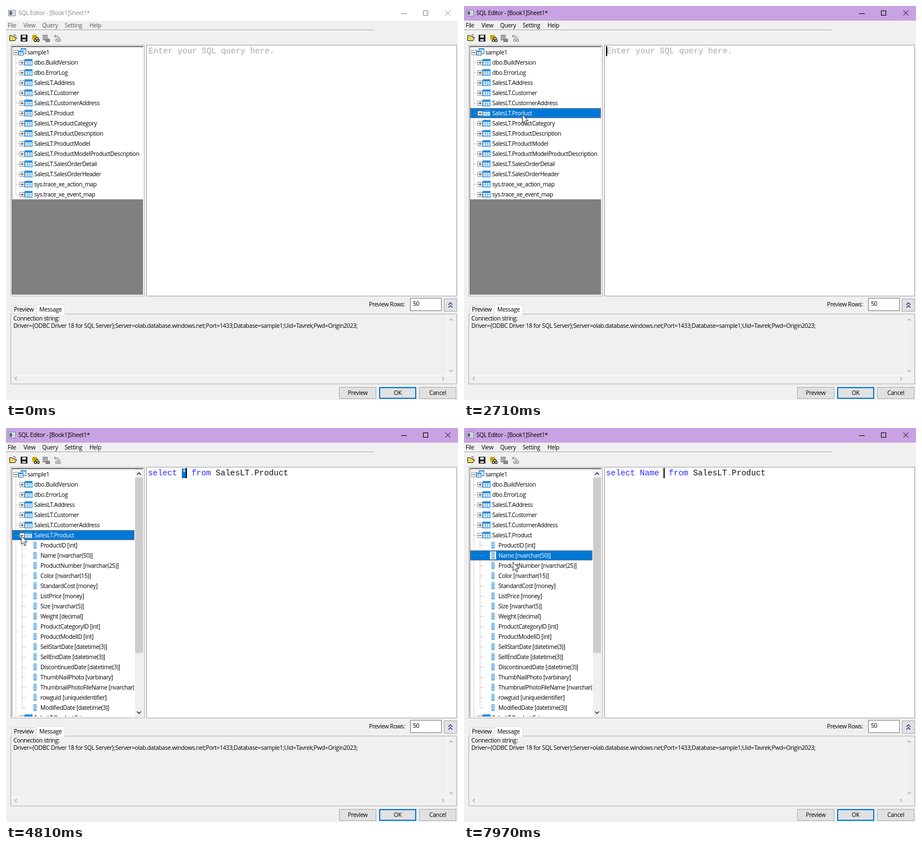
Recreate the animation shown at these times as an HTML page. Size 802 by 699 pixels, loop 8 s.

```html
<!DOCTYPE html>
<html lang="en">
<head>
<meta charset="utf-8">
<title>SQL Editor</title>
<style>
html, body { margin: 0; width: 100%; height: 100%; overflow: hidden; background: #f0f0f0; }
svg { display: block; }
text { font: 10.4px "Open Sans", "Noto Sans", sans-serif; letter-spacing: -.35px; }
.sql text { font: 14.3px "Liberation Mono", monospace; letter-spacing: 0; }
rect, .crisp { shape-rendering: crispEdges; }
</style>
</head>
<body>
<svg id="stage" width="802" height="699" viewBox="0 0 802 699"></svg>
<script>
const LOOP = 8000, CHAR = 8.58, SQL_X = 252;
const TABLES = ['dbo.BuildVersion', 'dbo.ErrorLog', 'SalesLT.Address', 'SalesLT.Customer',
  'SalesLT.CustomerAddress', 'SalesLT.Product', 'SalesLT.ProductCategory',
  'SalesLT.ProductDescription', 'SalesLT.ProductModel', 'SalesLT.ProductModelProductDescription',
  'SalesLT.SalesOrderDetail', 'SalesLT.SalesOrderHeader', 'sys.trace_xe_action_map',
  'sys.trace_xe_event_map'];
const COLUMNS = ['ProductID [int]', 'Name [nvarchar(50)]', 'ProductNumber [nvarchar(25)]',
  'Color [nvarchar(15)]', 'StandardCost [money]', 'ListPrice [money]', 'Size [nvarchar(5)]',
  'Weight [decimal]', 'ProductCategoryID [int]', 'ProductModelID [int]',
  'SellStartDate [datetime(3)]', 'SellEndDate [datetime(3)]', 'DiscontinuedDate [datetime(3)]',
  'ThumbNailPhoto [varbinary]', 'ThumbnailPhotoFileName [nvarchar(50)]',
  'rowguid [uniqueidentifier]', 'ModifiedDate [datetime(3)]'];
const OPEN_ROW = 5;

const rect = (x, y, w, h, fill, more = '') =>
  `<rect x="${x}" y="${y}" width="${w}" height="${h}" fill="${fill}" ${more}/>`;
const box = (x, y, w, h, fill, line) => rect(x, y, w, h, line) + rect(x + 1, y + 1, w - 2, h - 2, fill);
const text = (x, y, s, fill = '#000', more = '') => `<text x="${x}" y="${y}" fill="${fill}" ${more}>${s}</text>`;
const path = (d, line, w = 1, more = '') =>
  `<path d="${d}" fill="none" stroke="${line}" stroke-width="${w}" ${more}/>`;
const dots = (d, line = '#a8a8a8') => path(d, line, 1, 'class="crisp" stroke-dasharray="1 1"');

// ---- tree ----
function expander(x, y, open) {
  return box(x - 4, y - 4, 9, 9, '#fff', '#919191') +
    path(`M${x - 2} ${y + .5}h5` + (open ? '' : `M${x + .5} ${y - 2}v5`), '#333', 1, 'class="crisp"');
}
function tableIcon(x, y) {
  return box(x, y, 14, 12, '#fff', '#2b86d0') + rect(x, y, 14, 4, '#2f8fdd') +
    path(`M${x + 5} ${y + 4}v8M${x + 9} ${y + 4}v8M${x} ${y + 6.5}h14M${x} ${y + 9.5}h14`, '#55a9ea');
}
function columnIcon(x, y) {
  return box(x, y, 5, 12, '#e9f5ff', '#3a8fd4') +
    path(`M${x} ${y + 3.5}h5M${x} ${y + 6.5}h5M${x} ${y + 9.5}h5`, '#3a8fd4');
}
function rootIcon() {
  return box(26, 75, 10, 10, '#d8ebfb', '#3679b8') + rect(26, 75, 10, 2, '#3679b8') +
    box(22, 79, 9, 9, '#fff', '#3679b8') + rect(22, 79, 9, 3, '#4a9be0') +
    path('M25.5 82v5M23 84.5h7', '#74b4ea');
}
function tree(open, picked) {
  const right = open ? 228 : 243;
  const bottom = 82 + 18 * (TABLES.length + (open ? COLUMNS.length : 0));
  const mark = y => rect(11, y - 9, right - 11, 18, '#0078d7') +
    dots(`M11 ${y - 8.5}H${right}M11 ${y + 8.5}H${right}M11.5 ${y - 9}v18M${right - .5} ${y - 9}v18`, '#ff8728');
  let rows = dots(`M17.5 87V${bottom}`) + expander(17, 82, true) + rootIcon() + text(38, 86, 'sample1');
  let y = 82;
  TABLES.forEach((name, i) => {
    y += 18;
    const on = picked === name, isOpen = open && i === OPEN_ROW;
    if (on) rows += mark(y);
    rows += dots(`M17 ${y + .5}h7`) + expander(28, y, isOpen) + tableIcon(33, y - 6) +
      text(50, y + 4, name, on ? '#fff' : '#000');
    if (!isOpen) return;
    rows += dots(`M28.5 ${y + 9}v${18 * COLUMNS.length - 8}`);
    COLUMNS.forEach(col => {
      y += 18;
      const hit = picked === col;
      if (hit) rows += mark(y);
      rows += dots(`M28 ${y + .5}h8`) + (hit ? rect(46, y - 7, 11, 14, '#fff') : '') +
        columnIcon(49, y - 6) + text(61, y + 4, col, hit ? '#fff' : '#000');
    });
  });
  const scroll = rect(229, 73, 14, 439, '#f0f0f0') + rect(229, 88, 14, 311, '#cdcdcd') +
    path('M232.5 83l3.5-3.5 3.5 3.5M232.5 503l3.5 3.5 3.5-3.5', '#4a2450', 1.6);
  return rect(11, 73, 232, 439, '#808080') + rect(11, 73, 232, open ? 439 : 270, '#fff') +
    `<g clip-path="url(#${open ? 'narrow' : 'wide'})">${rows}</g>` + (open ? scroll : '');
}

// ---- window ----
function titleBar(active) {
  const ink = active ? '#000' : '#8c8c8c', menu = active ? '#000' : '#5a5a5a';
  const names = [[3, 'File'], [31, 'View'], [64, 'Query'], [104, 'Setting'], [148, 'Help']];
  return rect(0, 0, 802, 26, active ? '#c8a2e2' : '#fff') +
    box(4, 7, 13, 11, '#fff', '#77849a') + rect(6, 9, 5, 7, '#5a6b86') + rect(12, 9, 3, 7, '#c4ccd8') +
    text(22, 16, 'SQL Editor - [Book1]Sheet1*', ink) +
    path('M701 13.5h10M740.5 8.5h8v8h-8z', ink, 1, 'class="crisp"') +
    path('M779.5 8l9 9M788.5 8l-9 9', ink) +
    names.map(([x, s]) => text(x, 38, s, menu)).join('');
}
function linkIcon(x, body, ink) {
  return rect(x, 51, 9, 10, body, 'rx="2"') +
    path(`M${x + 1} 53.5h7M${x + 1} 56.5h5`, ink, .8) +
    `<g fill="#f0f0f0" stroke="${ink}" stroke-width="1.4"><circle cx="${x + 6}" cy="61" r="2"/>` +
    `<circle cx="${x + 11}" cy="61" r="2"/><path d="M${x + 6} 58l3-3 3 3"/></g>`;
}
function toolbar() {
  return rect(0, 42, 652, 1, '#a0a0a0') + rect(0, 43, 652, 1, '#fff') +
    '<path d="M6.5 61.5v-9h4l1 1.5h4v2h3.5l-3 5.5z" fill="#f5d65a" stroke="#222"/>' +
    path('M13 51.5q3-2 4.5 1', '#222') +
    box(26, 51, 12, 12, '#222', '#111') + rect(29, 52, 6, 4, '#fff') + rect(29, 59, 6, 3, '#ddd') +
    linkIcon(46, '#f0d21c', '#2a2a14') +
    rect(65, 51, 9, 10, '#999') + path('M66 54.5h7M66 57.5h7', '#c8c8c8') + rect(70, 58, 8, 6, '#858585') +
    path('M86 53.5h7M88 51l-2 2.5 2 2.5M90 56.5h6', '#929292', 1.3) +
    '<g fill="none" stroke="#929292" stroke-width="1.3"><circle cx="90" cy="61" r="2"/><circle cx="95" cy="61" r="2"/></g>';
}
function button(x, label, main) {
  const edge = main ? rect(x, 676, 66, 21, '#0078d7') + rect(x + 2, 678, 62, 17, '#e1e1e1')
    : box(x, 676, 66, 21, '#e1e1e1', '#adadad');
  return edge + text(x + 33, 690, label, '#000', 'text-anchor="middle"');
}
function lowerPart() {
  const conn = 'Driver={ODBC Driver 18 for SQL Server};Server=olab.database.windows.net;' +
    'Port=1433;Database=sample1;Uid=Tavrek;Pwd=Origin2023;';
  return box(8, 546, 792, 125, '#f0f0f0', '#b0b0b0') +
    rect(783, 547, 1, 108, '#fafafa') + rect(9, 655, 790, 1, '#fafafa') +
    box(9, 531, 46, 16, '#f0f0f0', '#dcdcdc') + box(54, 529, 51, 19, '#fff', '#dcdcdc') +
    rect(55, 546, 49, 2, '#fff') +
    text(14, 542, 'Preview') + text(59, 542, 'Message') +
    text(13, 558, 'Connection string:') + text(13, 571, conn) +
    path('M787 558l3-3 3 3M787 646l3 3 3-3M19 658l-3 3 3 3M774 658l3 3-3 3', '#a6a6a6', 1.2) +
    text(644, 533, 'Preview Rows:') + box(717, 518, 56, 23, '#fff', '#7a7a7a') + text(722, 532, '50') +
    box(777, 519, 23, 23, '#e1e1e1', '#adadad') +
    path('M785 530l3.5-3.5 3.5 3.5M785 535l3.5-3.5 3.5 3.5', '#1c2f78', 1.3) +
    button(591, 'Preview') + button(662, 'OK', true) + button(733, 'Cancel');
}
function query(step) {
  const at = (i, s, fill) => text(SQL_X + i * CHAR, 84, s, fill);
  if (!step) return text(253, 84, 'Enter your SQL query here.', '#a6a6a0');
  const from = step === 1 ? 9 : 13, blue = '#2a2af5';
  return at(0, 'select', blue) +
    (step === 1 ? rect(312, 72, 8, 17, '#0078d7') + at(7, '*', '#fff') : at(7, 'Name', blue)) +
    at(from, 'from', blue) + at(from + 5, 'SalesLT', '#111') +
    at(from + 12, '.', '#777') + at(from + 13, 'Product', '#111');
}

const stage = document.getElementById('stage');
stage.innerHTML =
  `<defs><clipPath id="wide"><rect x="11" y="73" width="232" height="439"/></clipPath>
  <clipPath id="narrow"><rect x="11" y="73" width="217" height="439"/></clipPath></defs>` +
  rect(0, 0, 802, 699, '#f0f0f0') + '<g id="title"></g>' + toolbar() +
  box(8, 69, 238, 446, '#fff', '#b4b4b4') + rect(10, 71, 234, 442, '#696969') +
  rect(243, 72, 1, 441, '#e8e8e8') + rect(10, 512, 234, 1, '#e8e8e8') +
  '<g id="tree"></g>' + box(249, 69, 551, 446, '#fff', '#a0a0a0') +
  '<g id="sql" class="sql"></g><rect id="caret" y="71" height="18"/>' + lowerPart() +
  '<circle id="glow" r="10.5" fill="#f0e010" fill-opacity=".7"/>' +
  '<path id="mouse" d="M0 0V15.2L3.5 12L6 17.5L8.3 16.5L6 11.2H10.6Z" fill="#fff" stroke="#111" stroke-width=".9"/>';
const part = id => document.getElementById(id);
const mouse = part('mouse'), glow = part('glow'), caret = part('caret');

// ---- motion ----
const MOVES = [[0, 806, 700], [70, 787, 684], [510, 453, 578], [620, 453, 578], [1370, 102.5, 209.5],
  [1460, 102.5, 203], [1540, 102.5, 198], [1610, 103.5, 192.5], [3270, 103.5, 192.5], [3890, 22, 191],
  [4010, 22, 191], [4440, 27, 191], [5440, 27, 191], [5730, 50.5, 215], [6290, 87, 233],
  [6380, 87, 233], [6440, 87, 229.5], [7969, 87, 229.5], [7970, 87, 238], [LOOP, 87, 238]];
const PRESSES = [[2010, 2160], [2620, 2710], [2790, 2860], [4490, 4660], [6520, 6670], [6910, 7050]];

function pointer(t) {
  const i = MOVES.findIndex(m => m[0] > t);
  const [t0, x0, y0] = MOVES[i - 1], [t1, x1, y1] = MOVES[i];
  let k = (t - t0) / (t1 - t0);
  if (t1 - t0 > 350) k = k * k * (3 - 2 * k);
  return [x0 + (x1 - x0) * k, y0 + (y1 - y0) * k];
}
const shown = {};
function update(id, key, draw) {
  if (shown[id] === key) return;
  shown[id] = key;
  part(id).innerHTML = draw();
}
function show(t) {
  const active = t >= 2080, open = t >= 4810, typed = t >= 6910 ? 2 : t >= 2860 ? 1 : 0;
  const picked = t >= 6670 ? COLUMNS[1] : active ? TABLES[OPEN_ROW] : '';
  update('title', active, () => titleBar(active));
  update('tree', open + picked, () => tree(open, picked));
  update('sql', typed, () => query(typed));
  caret.setAttribute('x', [252, 319, 354][typed]);
  caret.setAttribute('width', typed ? 2 : 1.5);
  const lit = t >= 170 && Math.floor((t - 170) / 530) % 2 === 0;
  caret.setAttribute('visibility', lit ? 'visible' : 'hidden');
  const place = `translate(${pointer(t).map(v => v.toFixed(1))})`;
  mouse.setAttribute('transform', place);
  glow.setAttribute('transform', place);
  mouse.setAttribute('visibility', t < 70 ? 'hidden' : 'visible');
  glow.setAttribute('visibility', PRESSES.some(([a, b]) => t >= a && t < b) ? 'visible' : 'hidden');
}
const start = performance.now();
function tick() {
  show((performance.now() - start) % LOOP);
  requestAnimationFrame(tick);
}
show(0);
requestAnimationFrame(tick);
</script>
</body>
</html>
```
